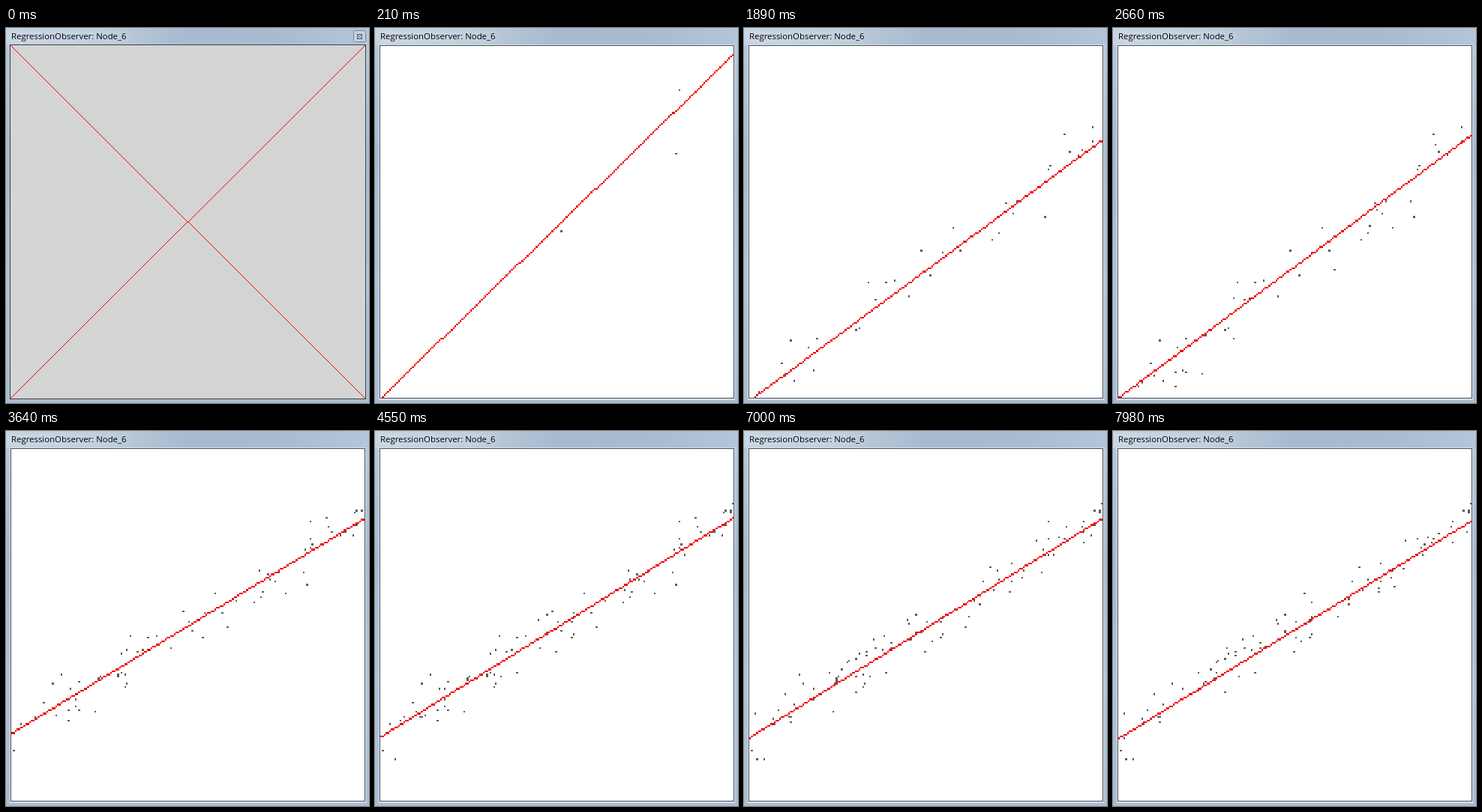
Write an HTML page with a canvas that moves like this. It is 484x501 px and loops after 8 s.

```html
<!DOCTYPE html>
<html lang="en">
<head>
<meta charset="utf-8">
<title>Regression plot</title>
<style>
html, body { margin: 0; width: 100%; height: 100%; overflow: hidden; }
canvas { display: block; }
</style>
</head>
<body>
<canvas id="stage" width="484" height="501"></canvas>
<script>
const ctx = document.getElementById('stage').getContext('2d');
const LOOP = 8000, STEP = 70, STEPS = Math.ceil(LOOP / STEP);
const LEFT = 7, TOP = 24, BOTTOM = 494, GRID = 200, CELL = 471 / GRID;
const RATE = 1.35;      // new samples per step
const WINDOW = 94;      // number of samples kept
const BASE = 398.8;     // height of zero in the final scale
const RESCALES = [18, 51];

// Samples that stretch the axis: step, x, y.
const outliers = [[18, 464, 110], [51, 10, 427], [53, 27, 439], [55, 476, 97]];

// Fitted line: step, height at the left edge, height at the right edge.
const fits = [
  [11, 399.1, 125.8], [27, 401.8, 122.6], [38, 398.6, 117.4],
  [65, 408.5, 115.5], [88, 408.5, 113.5], [114, 410.6, 119.4]
];

let seed = 41;
function random() {
  seed = (seed * 16807) % 2147483647;
  return seed / 2147483647;
}

// The vertical axis grows twice when a sample falls outside it.
function toScreen(y, step) {
  if (step >= RESCALES[1]) return y;
  return BOTTOM + (y - BASE) * (step < RESCALES[0] ? 1.684 : 1.25);
}

function randomSample(born) {
  let x, y, screenY;
  do {
    x = LEFT + random() * 469;
    y = 408 - 0.62 * (x - LEFT) + (random() + random() + random() - 1.5) * 34;
    screenY = toScreen(y, born);
  } while (screenY < TOP || screenY > BOTTOM);
  return { x, y, born };
}

const samples = outliers.map(([born, x, y]) => ({ x, y, born }));
for (let i = 1; i < STEPS * RATE; i++) samples.push(randomSample(Math.ceil(i / RATE)));
samples.sort((a, b) => a.born - b.born);

function fitAt(step) {
  if (step <= fits[0][0]) return fits[0].slice(1);
  const i = fits.findIndex(f => f[0] >= step);
  const a = fits[i - 1], b = fits[i];
  const k = (step - a[0]) / (b[0] - a[0]);
  return [a[1] + (b[1] - a[1]) * k, a[2] + (b[2] - a[2]) * k];
}

function drawCell(col, y) {
  const row = Math.floor((BOTTOM - y) / CELL);
  if (row < 0 || row >= GRID) return;
  const x0 = Math.round(LEFT + col * CELL), x1 = Math.round(LEFT + (col + 1) * CELL);
  const y0 = Math.round(BOTTOM - (row + 1) * CELL), y1 = Math.round(BOTTOM - row * CELL);
  ctx.fillRect(x0, y0, x1 - x0, y1 - y0);
}

function fillBox(color, x, y, w, h) {
  ctx.fillStyle = color;
  ctx.fillRect(x, y, w, h);
}

function gradient(x, y, colors) {
  const g = ctx.createLinearGradient(0, 0, x, y);
  colors.forEach((color, i) => g.addColorStop(i / (colors.length - 1), color));
  return g;
}

function drawFrame() {
  fillBox(gradient(0, 501, ['#b9cadb', '#a8bbce', '#b0c3d6', '#a9bdd1']), 0, 0, 484, 501);
  fillBox(gradient(484, 0, ['#c6d4e2', '#bfcedd', '#a8bacf', '#a9bbcf', '#b3c5d8']), 0, 0, 484, 23);
  ctx.save();
  ctx.font = '11.4px "Open Sans", "Noto Sans", sans-serif';
  ctx.fillStyle = '#000';
  ctx.shadowColor = 'rgba(255,255,255,0.8)';
  ctx.shadowBlur = 8;
  ctx.fillText('RegressionObserver: Node_6', 7, 15);
  ctx.restore();
}

function drawCloseButton() {
  ctx.lineWidth = 1;
  ctx.fillStyle = '#c3d1df';
  ctx.strokeStyle = '#74869a';
  ctx.beginPath();
  ctx.roundRect(463.5, 3.5, 16, 15, 2);
  ctx.fill();
  ctx.stroke();
  ctx.strokeStyle = '#596878';
  ctx.strokeRect(468.5, 8.5, 6, 6);
  ctx.beginPath();
  ctx.moveTo(469, 9);
  ctx.lineTo(474, 14);
  ctx.moveTo(474, 9);
  ctx.lineTo(469, 14);
  ctx.stroke();
}

function drawEmpty() {
  drawCloseButton();
  fillBox('#3c4248', 5, 22, 475, 474);
  fillBox('#d4d4d4', 6, 23, 473, 472);
  ctx.fillStyle = '#f00';
  for (let i = 0; i < 473; i++) {
    const y = 23 + Math.round(i * 471 / 472);
    ctx.fillRect(6 + i, y, 1, 1);
    ctx.fillRect(478 - i, y, 1, 1);
  }
}

function drawPlot(step) {
  fillBox('#d5e1ec', 5, 22, 475, 475);
  fillBox('#4a5058', 6, 23, 473, 472);
  fillBox('#fff', LEFT, TOP, 471, 470);
  ctx.fillStyle = '#5c5c5c';
  samples.filter(s => s.born <= step).slice(-WINDOW).forEach(s =>
    drawCell(Math.floor((s.x - LEFT) / CELL), toScreen(s.y, step)));
  const [a, b] = fitAt(step);
  ctx.fillStyle = '#f00000';
  for (let col = 0; col < GRID; col++) {
    drawCell(col, toScreen(a + (b - a) * col / GRID, step));
  }
}

function render(now) {
  const step = Math.floor((now % LOOP) / STEP);
  drawFrame();
  if (step < 2) drawEmpty();
  else drawPlot(step);
}

const start = performance.now();
function tick() {
  render(performance.now() - start);
  requestAnimationFrame(tick);
}
tick();
</script>
</body>
</html>
```
